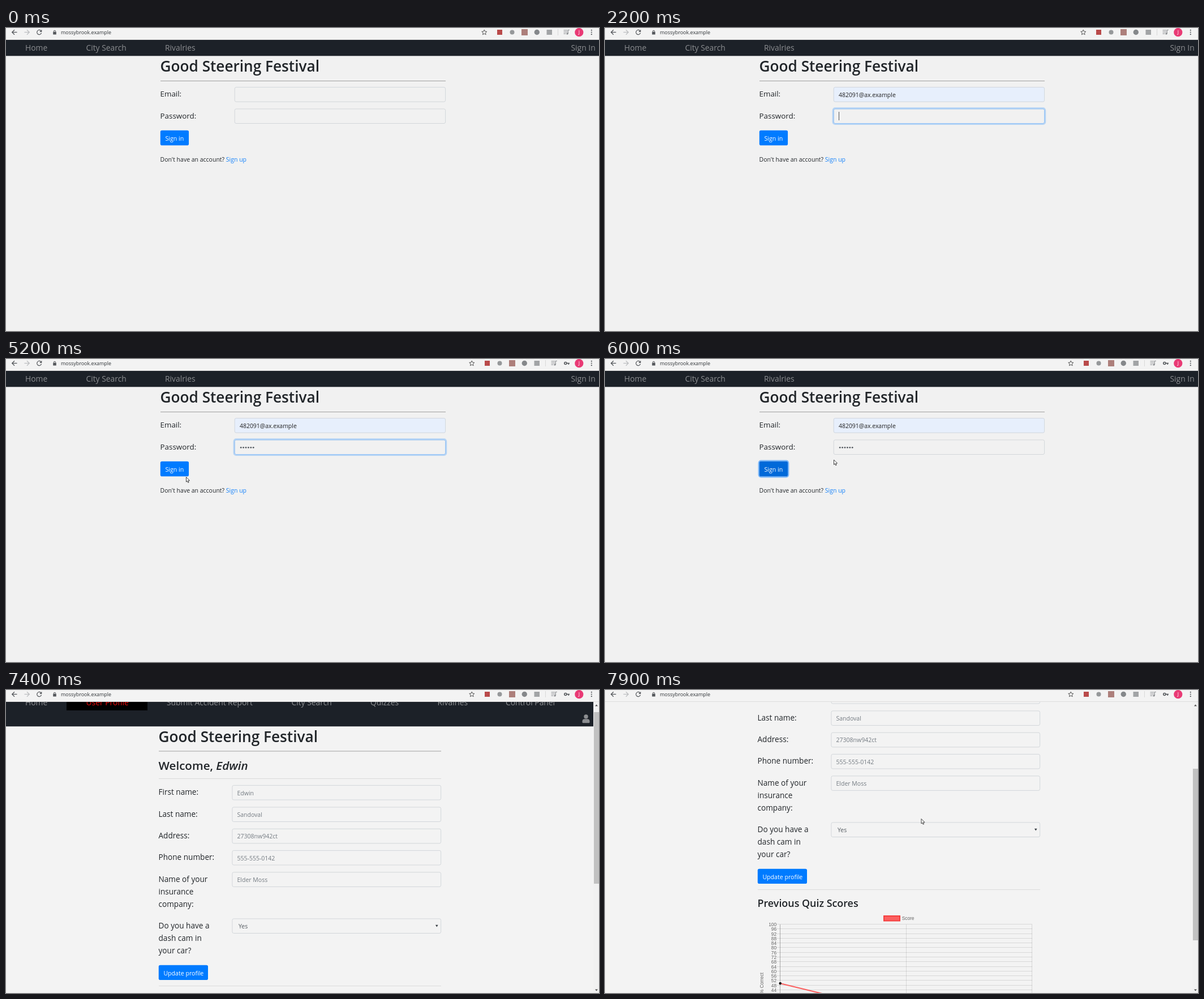
Write an HTML page with a canvas that moves like this. It is 1048 by 535 pixels and loops after 8 s.

```html
<!DOCTYPE html>
<html lang="en">
<head>
<meta charset="utf-8">
<title>Sign in</title>
<style>
  html, body { margin: 0; width: 100%; height: 100%; overflow: hidden; background: #f1f1f1; }
  canvas { display: block; width: 1048px; height: 535px; }
</style>
</head>
<body>
<canvas id="stage" width="1048" height="535"></canvas>
<script>
const ctx = document.getElementById('stage').getContext('2d');
const LOOP = 8000;
const SANS = '"Open Sans", "Noto Sans", sans-serif';
const ARIAL = '"Liberation Sans", Arial, sans-serif';
const INK = '#212529', BLUE = '#007bff', NAV = '#1c2128', NAV_TEXT = '#8c8e91';
const RULE = '#a0a0a0';
const BOX_H = 26.4;
const TITLE = 'Good Steering Festival';
const EMAIL = '482091@ax.example';

const KEYS = [3000, 3200, 3500, 3600, 3800, 4300];
const DOT_STEP = 4.4;

// start, end, hidden at, from x, y, to x, y
const POINTER = [
  [200, 500, 600, 83, 0, 403, 83],
  [1400, 1500, 1700, 450, 160, 458, 164],
  [5000, 5200, 5300, 395, 170, 318, 208],
  [5900, 6000, 6400, 340, 190, 404, 177.5],
  [6900, 7000, 7100, 143, 30, 584, 197],
  [7900, 8000, 8000, 558.5, 227, 558.5, 227]
];

const SCROLL = [[7400, 13], [7500, 50], [7600, 70], [7800, 105], [7900, 183]];

const clamp = v => Math.max(0, Math.min(1, v));
const ramp = (t, start) => t < start ? 0 : clamp((t - start + 50) / 150);
const blink = (t, start) => Math.floor((t - start) / 500) % 2 === 0;

function text(s, x, y, size, color = INK, opt = {}) {
  ctx.font = `${opt.style || ''} ${opt.weight || 400} ${size}px ${opt.font || SANS}`;
  ctx.textAlign = opt.align || 'left';
  ctx.fillStyle = color;
  ctx.fillText(s, x, y);
  return ctx.measureText(s).width;
}

function rect(x, y, w, h, color) {
  ctx.fillStyle = color;
  ctx.fillRect(x, y, w, h);
}

function round(x, y, w, h, r, fill, stroke, width = 1) {
  ctx.beginPath();
  ctx.roundRect(x, y, w, h, r);
  if (fill) { ctx.fillStyle = fill; ctx.fill(); }
  if (stroke) { ctx.strokeStyle = stroke; ctx.lineWidth = width; ctx.stroke(); }
}

function disc(x, y, r, color) {
  ctx.beginPath();
  ctx.arc(x, y, r, 0, 7);
  ctx.fillStyle = color;
  ctx.fill();
}

function line(points, color, width = 1) {
  ctx.beginPath();
  points.forEach(([x, y], i) => i ? ctx.lineTo(x, y) : ctx.moveTo(x, y));
  ctx.strokeStyle = color;
  ctx.lineWidth = width;
  ctx.stroke();
}

function poly(points, fill) {
  ctx.beginPath();
  points.forEach(([x, y]) => ctx.lineTo(x, y));
  ctx.closePath();
  ctx.fillStyle = fill;
  ctx.fill();
}

function ring(x, y, w, h, alpha) {
  if (alpha > 0) round(x - 1.1, y - 1.1, w + 2.2, h + 2.2, 4, null, `rgba(0,123,255,${alpha})`, 2.2);
}

function field(x, y, w, { fill, glow = 0 } = {}) {
  const edge = color => round(x + .4, y + .4, w - .8, BOX_H - .8, 2.6, null, color, .8);
  round(x, y, w, BOX_H, 2.8, fill);
  edge('#cbd0d5');
  if (glow > 0) {
    ring(x, y, w, BOX_H, .25 * glow);
    edge(`rgba(128,189,255,${glow})`);
  }
}

function button(label, x, y, w, dark, glow) {
  ring(x, y, w, BOX_H, .5 * glow);
  round(x, y, w, BOX_H, 2.8, dark ? '#0069d9' : BLUE);
  text(label, x + 8.6, y + 17.8, 10.6, '#fff');
}

function person(x, y) {
  disc(x, y - 3.6, 3.7, NAV_TEXT);
  round(x - 6.5, y + .8, 13, 7, [4, 4, 1.5, 1.5], NAV_TEXT);
}

function navbar(items, height, active) {
  rect(0, 21, 1048, height, NAV);
  if (active) rect(107, 21, 143, 28, '#000');
  for (const [label, x] of items) {
    const on = active && label === 'User Profile';
    text(label, x, 40, 13.85, on ? '#f00808' : NAV_TEXT);
  }
}

const GUEST = [['Home', 34], ['City Search', 141.5], ['Rivalries', 281], ['Sign In', 998.5]];
const MEMBER = [['Home', 34], ['User Profile', 141.5], ['Submit Accident Report', 284],
  ['City Search', 504.5], ['Quizzes', 644], ['Rivalries', 762.5], ['Control Panel', 883]];

function signIn(t) {
  const member = t >= 6400;
  if (member) {
    navbar(MEMBER, 56.3, t >= 6500);
    person(1036.5, 63.5);
  } else {
    navbar(GUEST, 28.3);
  }

  ctx.save();
  if (member) ctx.translate(0, 28);
  text(TITLE, 272.5, 76.5, 26.2, INK, { weight: 600 });
  rect(273, 93, 504, 1, RULE);
  text('Email:', 272.5, 121.3, 13.4);
  text('Password:', 272.5, 159.6, 13.4);

  const filled = t >= 1700;
  field(403.8, 104.2, 373.2, { fill: filled && '#e7effc', glow: ramp(t, 1000) * (1 - ramp(t, 2100)) });
  field(403.8, 142.5, 373.2, { glow: ramp(t, 2100) * (1 - ramp(t, 5500)) });
  if (filled) text(EMAIL, 413, 122, 10.45, '#222');

  if (t >= 1000 && t < 1700) {
    if (blink(t, 1000)) rect(413, 110, 1, 15, '#444');
    round(404.5, 132.5, 372, 33, 1.5, '#f3f3f3', '#d2d2d2');
    text(EMAIL, 413, 152.5, 9.4, '#333');
  }

  const typed = KEYS.filter(k => k <= t);
  typed.forEach((k, i) => disc(415.2 + i * DOT_STEP, 156.3, 1.4, '#555a60'));
  const reset = typed.length ? typed[typed.length - 1] : 2100;
  if (t >= 2100 && t < 5500 && blink(t, reset)) {
    rect(413 + Math.floor(typed.length * DOT_STEP), 148, 1, 15, '#555');
  }

  button('Sign in', 272.8, 180.8, 50.3, t >= 5300, ramp(t, 5500));
  text("Don't have an account?", 272.5, 235.8, 10.5);
  text('Sign up', 388.8, 235.8, 10.5, '#1683fb');
  ctx.restore();
}

function chart() {
  // laid out for a page scrolled by 183
  ctx.save();
  ctx.translate(0, 183);
  round(493, 399, 28, 8.5, 0, '#fb6060', '#f53f3f', 2);
  text('Score', 524.7, 405.8, 8.3, '#666', { font: ARIAL });
  const step = 8.29, top = 414;
  for (let i = 0; i <= 25; i++) {
    const y = Math.round(top + i * step) - .5;
    line([[303, y], [755, y]], 'rgba(0,0,0,.11)');
    text(100 - 4 * i, 303, y + 3.2, 8.3, '#666', { font: ARIAL, align: 'right' });
  }
  const bottom = top + 25 * step;
  line([[309.5, top], [309.5, bottom]], 'rgba(0,0,0,.3)');
  for (const x of [532.5, 754.5]) line([[x, top], [x, bottom]], 'rgba(0,0,0,.11)');
  line([[309.5, 518], [532, 572], [755, 540]], '#fb6060', 2.1);
  disc(309.7, 518, 2.2, '#000');
  ctx.translate(280, 517.5);
  ctx.rotate(-Math.PI / 2);
  text('% Correct', 0, 0, 8.3, '#666', { font: ARIAL, align: 'center' });
  ctx.restore();
}

const ROWS = [
  [181, ['First name:'], 'Edwin'],
  [219.5, ['Last name:'], 'Sandoval'],
  [257.8, ['Address:'], '27308nw942ct'],
  [296, ['Phone number:'], '555-555-0142'],
  [334.4, ['Name of your', 'insurance', 'company:'], 'Elder Moss'],
  [416.5, ['Do you have a', 'dash cam in', 'your car?'], null]
];

function profile(t) {
  const step = SCROLL.filter(s => s[0] <= t).pop();
  const scroll = step ? step[1] : 0;
  const loaded = t >= 6700;

  rect(0, 21, 1048, 514, '#f3f3f3');
  ctx.save();
  ctx.translate(0, -scroll);
  navbar(MEMBER, 56.3, true);
  person(1025, 63.5);

  text(TITLE, 269.5, 104.5, 26.2, INK, { weight: 600 });
  rect(270, 120.5, 499, 1, RULE);
  const w = text('Welcome, ', 269.5, 154, 20.6, INK, { weight: 600 });
  if (loaded) text('Edwin', 269.5 + w, 154, 20.6, INK, { weight: 600, style: 'italic' });
  rect(270, 169, 499, 1, '#d9d9d9');

  for (const [y, labels, value] of ROWS) {
    labels.forEach((s, i) => text(s, 269.5, y + 17.3 + 22 * i, 13.6));
    field(399.5, y, 369.5);
    if (value === null) {
      text('Yes', 411, y + 17.5, 10.5, '#555b61');
      poly([[759, y + 11.3], [763.6, y + 11.3], [761.3, y + 15]], '#343a40');
    } else if (loaded) {
      text(value, 408.5, y + 17.6, 10.5, '#747b82');
    }
  }
  button('Update profile', 269.8, 498.7, 87.2, false, 0);
  rect(270, 535, 499, 1, '#dcdcdc');
  text('Previous Quiz Scores', 269.5, 565.5, 17.9, INK, { weight: 600 });
  chart();
  ctx.restore();

  rect(1038, 21, 10, 514, '#f1f1f1');
  rect(1039, 31.4 + scroll * .588, 9, 303, '#c1c1c1');
  poly([[1041, 28.5], [1046, 28.5], [1043.5, 25.5]], '#505050');
  poly([[1041, 528.5], [1046, 528.5], [1043.5, 531.5]], '#505050');
}

function arrow(x, y, dir, color) {
  line([[x - 4.3 * dir, y], [x + 4.5 * dir, y]], color, 1.3);
  line([[x, y - 4.3], [x - 4.3 * dir, y], [x, y + 4.3]], color, 1.3);
}

function star(x, y) {
  const pts = [];
  for (let i = 0; i <= 10; i++) {
    const a = i * Math.PI / 5 - Math.PI / 2, r = i % 2 ? 2.2 : 4.8;
    pts.push([x + r * Math.cos(a), y + r * Math.sin(a)]);
  }
  line(pts, '#555', 1);
}

function toolbar(t) {
  rect(0, 0, 1048, 21, '#f3f3f3');
  rect(0, 20, 1048, 1, '#dedede');
  arrow(15, 7.5, 1, '#55585c');

  // forward points right, so its head is mirrored
  arrow(37, 7.5, -1, '#bcbec0');

  ctx.beginPath();
  ctx.arc(58.8, 7.5, 4, .3, 5.5);
  ctx.strokeStyle = '#55585c';
  ctx.lineWidth = 1.3;
  ctx.stroke();
  poly([[63.3, 2.8], [63.3, 7], [59.2, 7]], '#55585c');

  rect(83.2, 6.5, 5.6, 5, '#55585c');
  ctx.beginPath();
  ctx.arc(86, 6, 1.7, Math.PI, 0);
  ctx.lineWidth = 1;
  ctx.stroke();
  text('mossybrook.example', 97, 10.8, 8.95, '#303438');

  const key = t >= 3100;
  ctx.save();
  if (key) ctx.translate(-22, 0);
  star(845.3, 7.8);
  rect(868, 3, 9, 9, '#b94a4a');
  disc(894.5, 7.5, 4, '#96989a');
  rect(911, 2, 11, 11, '#ad7f7b');
  disc(938.3, 7.5, 4.7, '#85888b');
  rect(955.5, 3, 9.5, 9, '#a2a4a6');
  rect(975, 2, 1, 11, '#d8d8d8');
  for (const [y, len] of [[4, 7], [7, 7], [10, 4]]) rect(985.5, y - .5, len, 1, '#85888b');
  disc(992, 10, 1.6, '#85888b');
  line([[993.3, 10], [993.3, 3.5], [995.8, 3.5]], '#85888b', 1);
  ctx.restore();

  if (key) {
    ctx.beginPath();
    ctx.arc(988.8, 7.5, 2, 0, 7);
    ctx.strokeStyle = '#55585c';
    ctx.lineWidth = 1.6;
    ctx.stroke();
    line([[991, 7.5], [996, 7.5]], '#55585c', 1.6);
    line([[994.3, 7.5], [994.3, 10]], '#55585c', 1.5);
  }
  disc(1012.8, 7.7, 7.6, '#e93a75');
  text('J', 1012.8, 10.7, 8.5, '#fff', { align: 'center' });
  for (const y of [3.8, 7.5, 11.2]) disc(1034.8, y, 1.1, '#55585c');
}

function pointer(t) {
  const p = POINTER.find(([start, , hide]) => t >= start && t < hide);
  if (!p) return;
  const [start, end, , x0, y0, x1, y1] = p;
  const k = clamp((t - start) / (end - start));
  ctx.save();
  ctx.translate(x0 + (x1 - x0) * k, y0 + (y1 - y0) * k);
  const shape = [[.5, .5], [.5, 9], [2.4, 7.3], [3.7, 10.3], [5.1, 9.7], [3.9, 6.8], [6.5, 6.6], [.5, .5]];
  poly(shape, '#fff');
  line(shape, '#222', .85);
  ctx.restore();
}

function draw(t) {
  rect(0, 0, 1048, 535, '#f1f1f1');
  if (t < 6600) signIn(t); else profile(t);
  toolbar(t);
  pointer(t);
}

const began = performance.now();
function tick() {
  const t = (performance.now() - began) % LOOP;
  draw(Math.floor(t / 100) * 100);
  requestAnimationFrame(tick);
}
tick();
</script>
</body>
</html>
```
